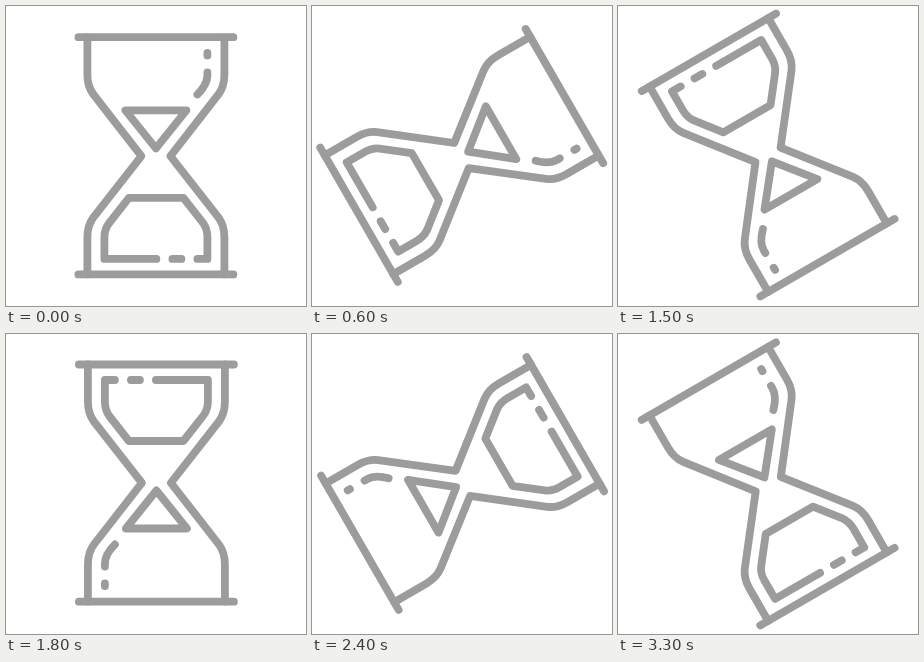
Recreate the animation shown at these times as an HTML page. Size 300 by 300 pixels, loop 3.6 s.

```html
<!DOCTYPE html>
<html lang="en">
<head>
<meta charset="utf-8">
<title>Turning hourglass</title>
<style>
  html, body { margin: 0; width: 100%; height: 100%; overflow: hidden; background: #fff; }
  svg { display: block; width: 100%; height: 100%; }
</style>
</head>
<body>
<svg viewBox="-0.4 -0.4 300 300">
  <g id="hourglass" fill="none" stroke="#9c9c9c" stroke-width="7.8" stroke-linecap="round" stroke-linejoin="round">
    <!-- end bars -->
    <path d="M72 30.8H227M72 268H227"/>
    <!-- glass walls -->
    <path d="M81 31V68Q81 80 87 88L135 149.7L87 211Q81 219 81 231V268"/>
    <path d="M218 31V68Q218 80 212 88L164 149.7L212 211Q218 219 218 231V268"/>
    <!-- upper sand and highlight -->
    <path d="M119 104H180L149.5 142Z"/>
    <path d="M201 46.5V49M201 66V69Q201 78 191 88"/>
    <!-- lower sand -->
    <path d="M150 252.5H98V231Q98 223 102.5 217L122.5 191.5H177L197 217Q201 223 201 231V252.5H191M166 252.5H175"/>
  </g>
</svg>
<script>
  const STEP_MS = 300;
  const STEPS = 12;
  const hourglass = document.getElementById("hourglass");

  function draw(now) {
    const step = Math.floor(now / STEP_MS) % STEPS;
    hourglass.setAttribute("transform", `rotate(${step * 360 / STEPS} 149.75 149.05)`);
    requestAnimationFrame(draw);
  }
  draw(performance.now());
</script>
</body>
</html>
```
